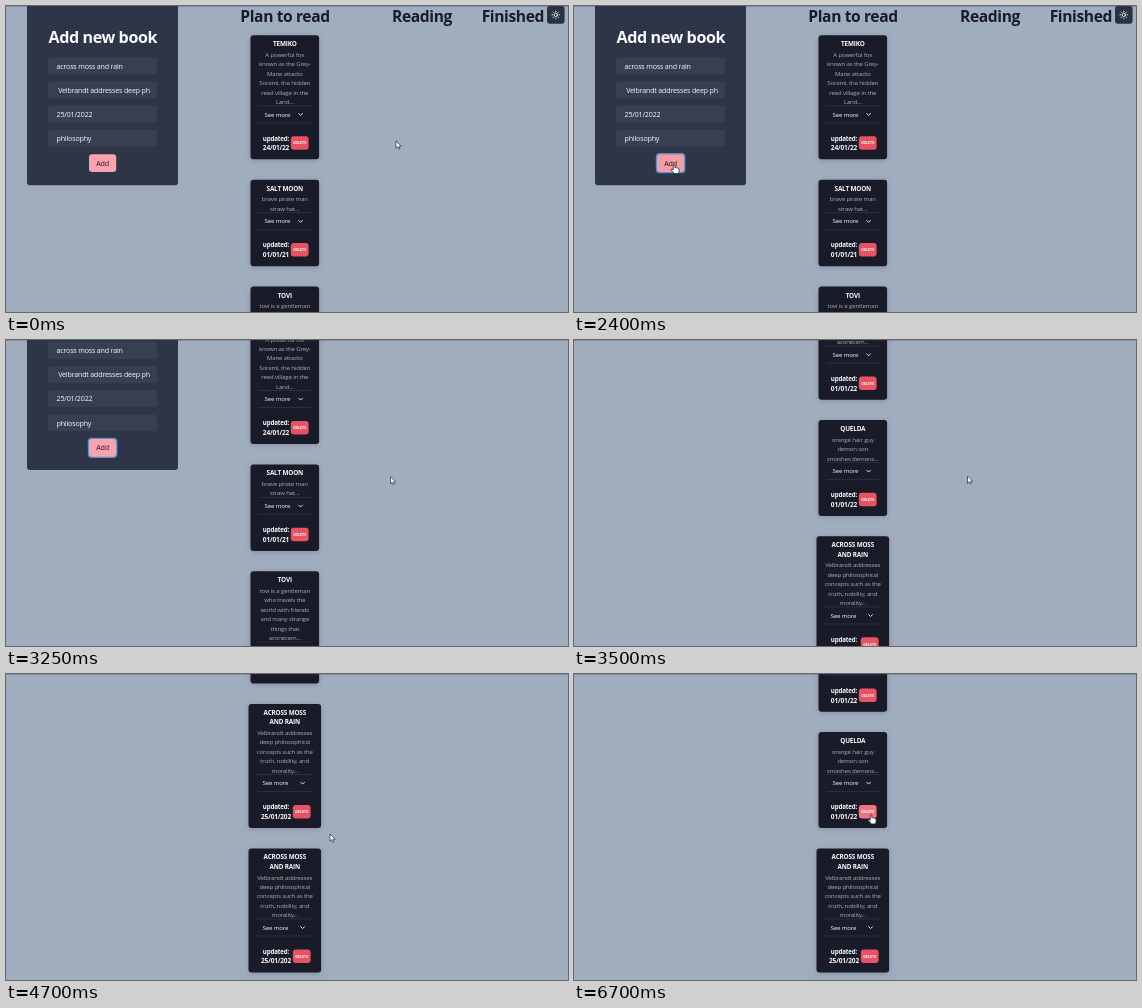
These frames come from a looping animation (562x306 px, 7050 ms). An HTML page:

```html
<!DOCTYPE html>
<html lang="en">
<head>
<meta charset="utf-8">
<title>Reading board</title>
<style>
  html, body { margin: 0; width: 100%; height: 100%; overflow: hidden; background: #a0adbf; }
  svg { display: block; width: 100%; height: 100%; font-family: "Open Sans", "Noto Sans", sans-serif; }
  text { white-space: pre; letter-spacing: -.025em; }
  .bold { font-weight: 700; }
  .mid { text-anchor: middle; }
  .card { filter: drop-shadow(0 1.5px 2.5px rgba(20, 25, 40, .2)); }
  .rule { stroke: #353b4a; stroke-width: .6; }
  .line { fill: none; stroke: #f3f5f8; stroke-width: .9; stroke-linecap: round; stroke-linejoin: round; }
  .pointer path { fill: #fff; stroke: #15171d; stroke-width: .7; stroke-linejoin: round; }
</style>
</head>
<body>
<svg id="stage" viewBox="0 0 562 306"></svg>
<script>
const LOOP = 7050, TICK = 50;
const INK = '#191c28', PAPER = '#f8f9fb', MUTED = '#a7aebc';
const RED = '#e95262', RED_HOVER = '#f6717d';
const PINK = '#faa3ac', PINK_HOVER = '#fbb3ba', PINK_DOWN = '#f1858f';
const stage = document.getElementById('stage');

function add(parent, tag, attrs = {}, content = '') {
  const el = document.createElementNS('http://www.w3.org/2000/svg', tag);
  for (const key in attrs) el.setAttribute(key, attrs[key]);
  el.textContent = content;
  parent.appendChild(el);
  return el;
}

const box = (parent, x, y, width, height, fill, rx = 2.5) =>
  add(parent, 'rect', { x, y, width, height, fill, rx });

// y is the optical middle of the line
const label = (parent, content, x, y, size, fill, cls = '') =>
  add(parent, 'text', { x, y: y + size * .365, 'font-size': size, fill, class: cls }, content);

const page = add(stage, 'g');

// Form
box(page, 21, -4, 151, 183.2, '#2d3547', 3);
label(page, 'Add new book', 96.8, 31.5, 16.1, PAPER, 'bold mid');
['across moss and rain', ' Velbrandt addresses deep ph', '25/01/2022', 'philosophy'].forEach((value, i) => {
  const y = 51.4 + i * 24.1;
  box(page, 42, y, 109, 16.8, '#373f51');
  label(page, value, 50.5, y + 8.6, 7.1, PAPER);
});
const addRing = box(page, 82.6, 147.8, 28, 18.6, 'none', 3);
addRing.setAttribute('stroke', '#4f94cf');
addRing.setAttribute('stroke-width', 1.6);
const addButton = box(page, 83, 148.2, 27.2, 17.8, PINK, 3);
label(page, 'Add', 96.6, 157.2, 7.2, INK, 'mid');

// Column headings and theme switch
label(page, 'Plan to read', 279, 10.2, 15.6, INK, 'bold mid');
label(page, 'Reading', 416, 10.2, 15.6, INK, 'bold mid');
label(page, 'Finished', 506.8, 10.2, 15.6, INK, 'bold mid');
box(page, 541, -.2, 17.6, 18, '#2a3143', 3);
const sun = add(page, 'g', { class: 'line', transform: 'translate(549.8 8.8)' });
add(sun, 'circle', { r: 1.7 });
for (let i = 0; i < 8; i++)
  add(sun, 'path', { d: 'M0 -3.2V-3.9', transform: `rotate(${i * 45})` });

// Cards stack downwards, each as tall as its text
const PITCH = 9.4, GAP = 20.4, CENTER = 278.8;
let nextTop = 29.2;

function card(titles, lines, date, width = 68.6) {
  const g = add(page, 'g');
  const left = CENTER - width / 2, right = CENTER + width / 2;
  const textTop = nextTop + 19.5 + (titles.length - 1) * PITCH;
  const more = textTop + (lines.length - 1) * PITCH + 12.6;
  const height = more + 45 - nextTop;

  box(g, left, nextTop, width, height, INK, 3).setAttribute('class', 'card');
  titles.forEach((s, i) => label(g, s, CENTER, nextTop + 8.6 + i * PITCH, 6.35, PAPER, 'bold mid'));
  lines.forEach((s, i) => label(g, s, CENTER, textTop + i * PITCH, 6.1, MUTED, 'mid'));
  [-8.5, 8.5].forEach(dy =>
    add(g, 'path', { class: 'rule', d: `M${left + 7.5} ${more + dy}H${right - 7.5}` }));
  label(g, 'See more', left + 14.1, more, 6.1, PAPER);
  add(g, 'path', { class: 'line', d: `M${right - 20.4} ${more - .8}l1.9 1.9 1.9 -1.9` });
  label(g, 'updated:', 270, more + 24, 6.2, PAPER, 'bold mid');
  label(g, date, 270, more + 33.5, 6.5, PAPER, 'bold mid');
  const button = box(g, right - 28.3, more + 21.9, 17.8, 13.5, RED, 3);
  label(g, 'DELETE', right - 19.4, more + 28.7, 3.8, PAPER, 'bold mid');

  nextTop += height + GAP;
  return { g, button, step: height + GAP };
}

const moss = () => card(['ACROSS MOSS', 'AND RAIN'],
  ['Velbrandt addresses', 'deep philosophical', 'concepts such as the', 'truth, nobility, and', 'morality...'],
  '25/01/202', 72.6);

card(['TEMIKO'],
  ['A powerful fox', 'known as the Grey-', 'Mane attacks', 'Sorami, the hidden', 'reed village in the', 'Land...'], '24/01/22');
card(['SALT MOON'], ['brave pirate man', 'straw hat...'], '01/01/21');
card(['TOVI'],
  ['tovi is a gentleman', 'who travels the', 'world with friends', 'and many strange', 'things that', 'aconecem...'], '01/01/22');
const third = card(['QUELDA'], ['orange hair guy', 'demon son', 'smashes demons...'], '01/01/22');
const removed = moss();
const kept = moss();

add(stage, 'rect', { width: 562, height: .7, fill: '#364056', opacity: .4 });

// Pointer
const pointer = add(stage, 'g', { class: 'pointer' });
const arrow = add(pointer, 'path', {
  d: 'M0 0V7.9L1.8 6.3 3.1 9 4.4 8.4 3.2 5.8H5.7Z', transform: 'scale(.9)'
});
const hand = add(pointer, 'path', {
  d: 'M-.8 .6Q0 -.6 .8 .6V3.6Q1.7 2.9 2.3 3.8 3.3 3.3 3.8 4.3 5 4 5.1 5.2V7.2Q5 8.4 4.3 9.6H.2Q-.6 8.2 -2.8 6.2C-3.4 5.2 -2.2 4.6 -.8 6Z'
});

// Motion
const SCROLL_END = 511.5, REMOVED_AT = 6150;
const ramp = (t, from, to) => Math.min(1, Math.max(0, (t - from) / (to - from)));
const smooth = u => u * u * (3 - 2 * u);
const easeOut = u => 1 - (1 - u) ** 3;
const mix = (a, b, u) => `color-mix(in srgb, ${b} ${u * 100}%, ${a})`;
const shift = (el, x, y) => el.setAttribute('transform', `translate(${x} ${y})`);

const legs = [
  { from: 300, to: 350, x: 222, y: 220, jump: true },
  { from: 500, to: 700, x: 531, y: 7 },
  { from: 700, to: 900, x: 1, y: 218 },
  { from: 1000, to: 1450, x: 134.8, y: 190 },
  { from: 1450, to: 1750, x: 100, y: 158 },
  { from: 2700, to: 3500, x: 393.5, y: 136 },
  { from: 3500, to: 3800, x: 408.7, y: 143 },
  { from: 3800, to: 4300, x: 324, y: 160 },
  { from: 4700, to: 5100, x: 281, y: 138 },
  { from: 5100, to: 5450, x: 297, y: 140.3 }
];

function pointerAt(t) {
  let x = 390, y = 135;
  for (const leg of legs) {
    const u = leg.jump ? +(t >= leg.to) : easeOut(ramp(t, leg.from, leg.to));
    x += (leg.x - x) * u;
    y += (leg.y - y) * u;
  }
  return [x, y];
}

// Each press dips for two ticks and recovers
const press = (t, at) => ramp(t, at - TICK, at) - ramp(t, at + TICK, at + 3 * TICK);

function draw(t) {
  const gone = t >= REMOVED_AT ? removed.step : 0;
  shift(page, 0, gone - SCROLL_END * smooth(ramp(t, 3137.5, 3723.5)));
  shift(kept.g, 0, -gone);
  removed.g.style.opacity = 1 - ramp(t, 5650, REMOVED_AT);

  const overAdd = ramp(t, 1700, 1750) - ramp(t, 2750, 2850);
  const pressed = press(t, 1800) + press(t, 2300);
  addButton.style.fill = mix(mix(PINK, PINK_HOVER, overAdd), PINK_DOWN, pressed);
  addRing.style.opacity = ramp(t, 1800, 1950);
  removed.button.style.fill = mix(RED, RED_HOVER, ramp(t, 5300, 5450));
  third.button.style.fill = mix(RED, RED_HOVER, ramp(t, REMOVED_AT, REMOVED_AT + 200));

  const overButton = t >= 1750 && t < 2800 || t >= 5400;
  hand.style.opacity = +overButton;
  arrow.style.opacity = +!overButton;
  shift(pointer, ...pointerAt(t));
}

// The picture is refreshed twenty times a second
function frame(now) {
  draw(Math.floor((now + 1) % LOOP / TICK) * TICK);
  requestAnimationFrame(frame);
}
draw(0);
requestAnimationFrame(frame);
</script>
</body>
</html>
```
